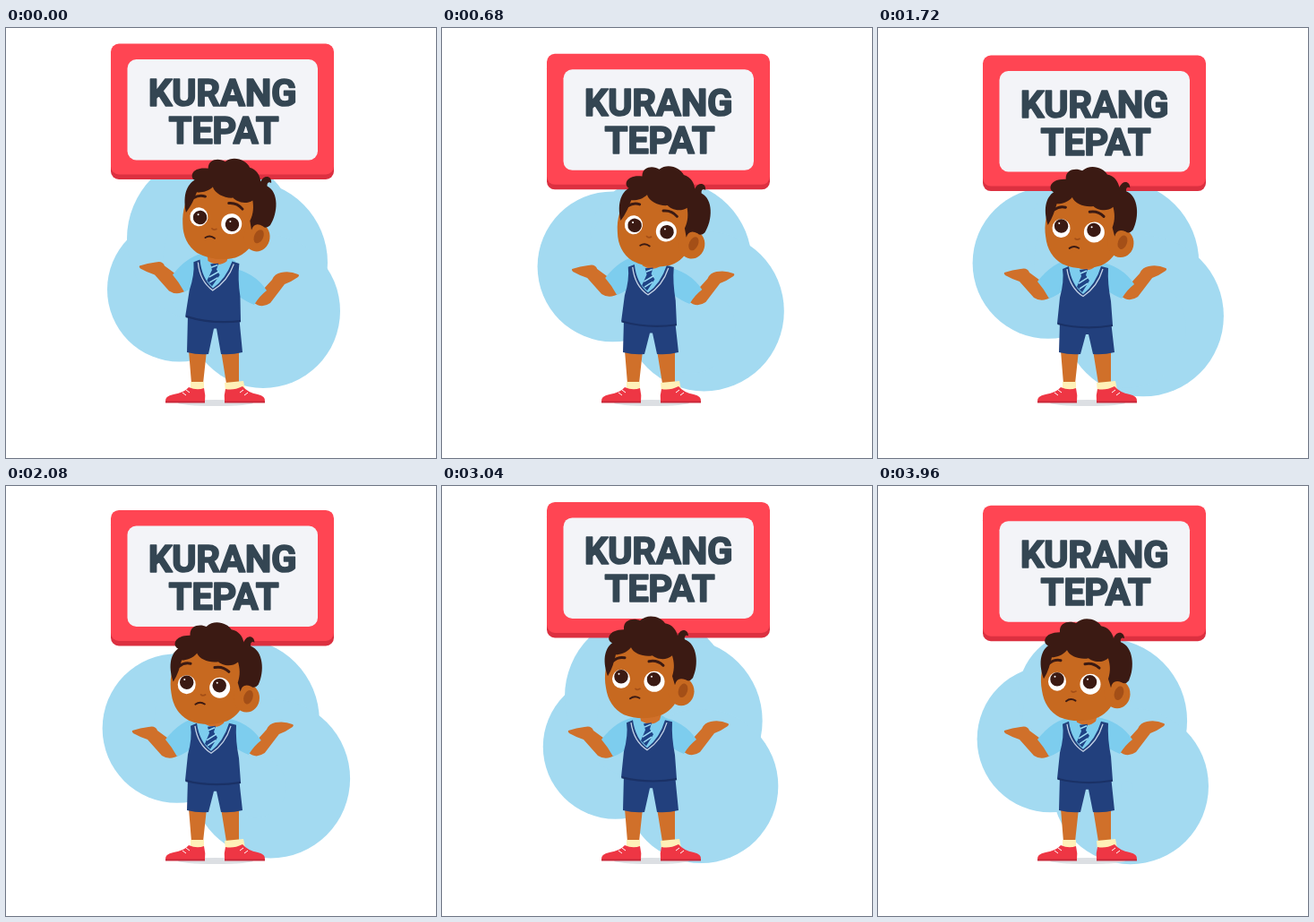
These frames come from a looping animation (480 px wide and 480 px high, 4000 ms). An HTML page:

```html
<!DOCTYPE html>
<html lang="id">
<head>
<meta charset="utf-8">
<title>Kurang tepat</title>
<style>
  html, body { margin: 0; width: 100%; height: 100%; overflow: hidden; background: #fff; }
  svg { display: block; width: 100vw; height: 100vh; }
  .label { font: 700 42px Roboto, sans-serif; text-anchor: middle; letter-spacing: -.4px;
    fill: #344653; stroke: #344653; stroke-width: 1.6; stroke-linejoin: round; }
  .skin { fill: #d0702a; }
  .face { fill: #c76920; }
  .shade { fill: #a44f17; }
  .hair { fill: #3b1a13; }
  .shirt { fill: #7dcdee; }
  .navy { fill: #22407d; }
  .red { fill: #ee3644; }
  .sock { fill: #fff1b8; }
  .line { fill: none; stroke: #3b1a13; stroke-linecap: round; }
</style>
</head>
<body>
<svg viewBox="0 0 480 480">
  <g id="blobs" fill="#a3daf1"></g>

  <g id="sign">
    <rect x="117" y="25" width="249" height="144" rx="9" fill="#dc3040"/>
    <rect x="117" y="17.5" width="249" height="146" rx="9" fill="#ff4553"/>
    <rect x="135.5" y="35" width="212.5" height="112.5" rx="10" fill="#f3f4f8"/>
    <text class="label" x="241.5" y="87">KURANG</text>
    <text class="label" x="243" y="128.5">TEPAT</text>
  </g>

  <ellipse cx="234" cy="418.500" rx="42" ry="3.500" fill="#dcdfe3"/>

  <path class="skin" d="M204 360H224L220 397H207ZM240 360H260V397H246Z"/>
  <path class="sock" d="M206 395H221V405H206ZM244 396L265 394L267 404L245 406Z"/>
  <path class="red" d="M221 402Q223 410 222 417H178Q177 411 187 409Q199 407 204 401Q213 405 221 402Z"/>
  <path class="red" d="M245 403Q243 410 244 417H289Q290 411 281 409Q270 407 264 400Q254 405 245 403Z"/>
  <path fill="none" stroke="#c82739" stroke-width="1.8" d="M178 417.500H222M244 417.500H289"/>
  <path fill="none" stroke="#fff" d="M197 407l4 3M201 404l4 3M265 404l-4 3M270 407l-4 3"/>

  <path id="shorts" class="navy"/>

  <g id="armL">
    <path class="skin" d="M141 273Q150 270 159 269Q167 267 169 273L184 284L194 300Q183 307 174 301L158 283Q149 280 142 276Q140 274 141 273Z"/>
    <path class="shirt" d="M216 258Q195 261 178 283Q185 291 191 302Q202 298 210 290Z"/>
  </g>
  <g id="armR">
    <path class="skin" d="M319 265Q310 261 300 263Q293 264 290 271L280 282L269 296Q278 304 288 297L304 276Q312 273 319 268Q321 266 319 265Z"/>
    <path class="shirt" d="M244 258Q270 262 284 283Q276 289 270 299Q262 296 252 289Z"/>
  </g>

  <g id="torso">
    <path class="shirt" d="M211 260L222 256H246L253 261L250 280L230 293L212 280Z"/>
    <path class="skin" d="M220 250H246L243 261Q234 269 222 262Z"/>
    <path class="navy" d="M206 264L213 261Q216 282 229 292Q243 281 249 261L257 263Q256 280 260 300L262 327Q230 333 200 325L203 296Q208 278 206 264Z"/>
    <path fill="none" stroke="#c4d2e6" stroke-width="1.3" d="M211 264Q214 285 229 294.500Q245 284 251 264"/>
    <path fill="none" stroke="#1a3166" stroke-width="2.2" d="M200.500 325Q230 332.500 262 327"/>
    <path fill="#1f4386" d="M225 265L234 264L232 271L236 277L228 290L222 284L227 272Z"/>
    <path fill="none" stroke="#9edcf5" stroke-width="1.5" d="M224 280L235 273M225 286L234 280M226 269L233 266"/>
  </g>

  <g id="head">
    <path class="face" d="M190 180Q179 205 183 225Q186 246 203 255Q224 263 246 255Q262 247 266 228L262 180Z"/>
    <ellipse class="face" cx="267" cy="229" rx="14.5" ry="16"/>
    <ellipse class="shade" cx="269" cy="228" rx="5" ry="8" transform="rotate(18 269 228)"/>
    <path class="hair" d="M185 212C178 192 183 180 190 175C183 172 185 160 203 160C202 148 215 147 221 150C230 141 245 146 249 153C257 154 262 161 263 167C266 158 275 159 275 167C272 165 270 168 271 171C285 176 287 199 280 214Q276 219 272 216Q262 212 260 222L257 212C260 203 259 196 257 189C249 196 238 192 235 189C226 191 214 187 211 180C206 186 199 188 194 188C192 196 190 204 185 212Z"/>
    <ellipse cx="200" cy="215" rx="10" ry="10.5" fill="#fff"/>
    <circle cx="237" cy="218" r="11.5" fill="#fff"/>
    <g id="gaze">
      <path class="line" stroke-width="15.5" d="M200.500 215.500h0M237 218.500h0"/>
      <path class="line" style="stroke:#fff" stroke-width="2" d="M198 212.500h0M234.500 215.500h0"/>
    </g>
    <path class="line" stroke-width="3" d="M191 195Q197 190 204 191.500M231 195.500Q240 193.500 247 200"/>
    <path class="line" style="stroke:#a44f17" stroke-width="1.7" d="M216 226Q218 228 221 226"/>
    <path class="line" stroke-width="1.9" d="M210 237Q215 233 220.500 236.500"/>
  </g>
</svg>
<script>
  const LOOP = 4000, STEP = 40, PEAK = 1250;
  const { PI, sin, cos, min, max } = Math;
  const $ = id => document.getElementById(id);

  const lobes = Array.from({ length: 5 }, () =>
    $('blobs').appendChild(document.createElementNS('http://www.w3.org/2000/svg', 'circle')));

  function place(lobe, cx, cy, r) {
    lobe.setAttribute('cx', cx);
    lobe.setAttribute('cy', cy);
    lobe.setAttribute('r', r);
  }
  const move = (id, x, y, turn = '') =>
    $(id).setAttribute('transform', `translate(${x} ${y}) ${turn}`);

  // 0 before a, 1 after b, smooth between
  const ease = (t, a, b) => (1 - cos(PI * min(max((t - a) / (b - a), 0), 1))) / 2;

  // Sinks quickly to its lowest point, then floats back up
  const float = t => t < PEAK
    ? sin(PI / 2 * t / PEAK)
    : (1 + cos(2 * PI * (t - PEAK) / LOOP)) / 2;

  function drawBlobs(t, f) {
    const [left, top, side, low, drop] = lobes;
    place(left, 193.5 - 4 * f, 292 - 34 * f, 80.5 + 4.5 * f);
    place(top, 230, 235, max(95 - 75 * f, 65));
    place(side, 260 + 7 * cos(2 * PI * t / 1600), 262, 92);
    place(low, 287 + 9 * sin(PI * t / 3300), 316 + 19 * ease(t, 1000, 3000), 86 + 4.5 * f);
    place(drop, 278, 336, 87 * f * f);
  }

  function draw(t) {
    const f = float(t);
    const lean = 1 - ease(t, 200, 2600);
    const shrug = 1 - ease(t, 0, 1400);
    const look = ease(t, 1200, 1600);
    const bodyY = 6.3 * f - 1.5 * lean;

    drawBlobs(t, f);
    move('sign', 0, 15 * f);
    move('head', 9 * lean, 11.3 * f, `rotate(${7.5 * lean} 235 262)`);
    move('gaze', .8 - 1.3 * look, -3 * look);
    move('torso', 0, bodyY, `rotate(${3 * shrug} 232 328)`);
    move('armL', 8 * shrug, -7.5 * shrug);
    move('armR', 7 * lean, 10 * lean);

    const top = 322 + bodyY;
    $('shorts').setAttribute('d',
      `M203 ${top}H260L264 362Q252 365 240 364L235 ${top + 15}H232L226 364Q214 365 202 362Z`);
  }

  const start = performance.now();
  function tick() {
    const t = (performance.now() - start) % LOOP;
    draw(t - t % STEP);
    requestAnimationFrame(tick);
  }
  tick();
</script>
</body>
</html>
```
